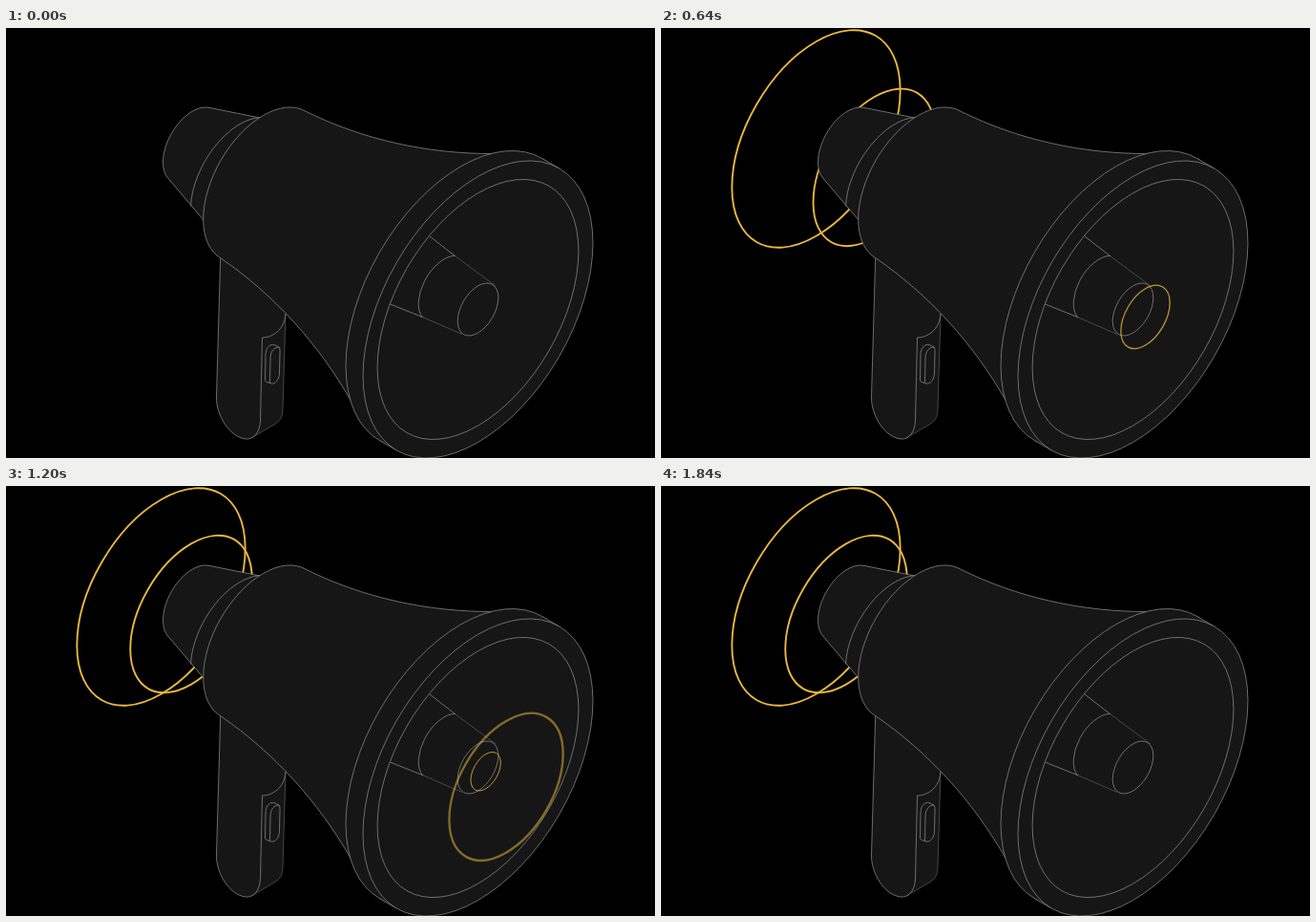
These frames come from a looping animation (680 px wide and 450 px high, 2000 ms). An HTML page with a canvas:

```html
<!DOCTYPE html>
<html lang="en">
<head>
<meta charset="utf-8">
<title>Megaphone</title>
<style>
  html, body { margin: 0; width: 100%; height: 100%; overflow: hidden; background: #000; }
  canvas { display: block; }
</style>
</head>
<body>
<canvas id="stage" width="680" height="450"></canvas>
<script>
const ctx = document.getElementById('stage').getContext('2d');
const LOOP = 2000, STEP = 40, LAST = 1840;
const FILL = '#161616', LINE = '#858585', DIM = '#555', GOLD = '#e9b83e';
const HUB = { x: 494.5, y: 294.5 };
const TILT = -Math.PI / 3;
const MAJOR = Math.sqrt(1.5), MINOR = Math.sqrt(0.5);

const clamp = v => Math.min(1, Math.max(0, v));
const sineOut = p => Math.sin(p * Math.PI / 2);
const sineInOut = p => (1 - Math.cos(p * Math.PI)) / 2;

// A circle of radius r seen in isometric view
function disc(x, y, r) {
  const p = new Path2D();
  p.ellipse(x, y, r * MAJOR, r * MINOR, TILT, 0, Math.PI * 2);
  return p;
}

function paint(path, fill, line, width = 0.8) {
  if (fill) {
    ctx.fillStyle = fill;
    ctx.fill(path);
  }
  if (line) {
    ctx.strokeStyle = line;
    ctx.lineWidth = width;
    ctx.stroke(path);
  }
}

const shape = d => new Path2D(d);

// The left-hand side of an isometric circle, as an SVG arc
const arc = (r, x, y) => `A${r * MAJOR} ${r * MINOR} -60 0 0 ${x} ${y}`;

const cap = shape('M266 94L213 83.4' + arc(35.5, 170.5, 158) + 'L207 201');
const collar = shape('M266 93.6' + arc(59.6, 193.5, 186.5));
const body = shape('M512 131.5C441 132 373 116.5 313.9 87.1' + arc(72.5, 225.1, 240.9) +
  'C279.6 278.3 327 329.4 362 391.2');
const handle = shape('M224.7 235L220.5 386C220 405 234 428 251 430L257 429L281 415' +
  'C287 411 290 408 290 398L293 299V280Z');
const handleFace = shape('M224.7 240L220.5 386C220 405 234 428 251 430' +
  'C259 431 266 424 266.5 411L268.5 324C279 324 292 316 293 299');
const handleSide = shape('M293 299L290 398C290 408 287 411 281 415L257 429');
const button = shape('M271.5 368L272 342C272 334 277 330.5 281 331.5L286 334' +
  'C287 335 287 337 287 339L286.5 361C286.5 368 282 373 278 372L273 370.5C272 370 271.5 369 271.5 368Z');
const buttonFace = shape('M276.5 371L277 346C277 338 281 334 286 334');

const rimBack = disc(476.5, 284, 139.1);
const rimSide = shape('M561.7 136.5L579.7 147L409.3 442L391.3 431.5Z');
const rimEdges = shape('M561.7 136.5L579.7 147M409.3 442L391.3 431.5');
const rimFront = disc(HUB.x, HUB.y, 139.1);
const rimInner = disc(HUB.x, HUB.y, 121.7);
const hub = disc(HUB.x, HUB.y, 24.6);
const coneNear = shape('M444 218L471 239M402.5 289L437 302.8');
const coneFar = shape('M471 239L513 270M437 302.8L478 320.5');
const coneArc = shape('M470.5 238.3' + arc(31, 436.5, 302.8));

function drawBackRings(t) {
  const a = 1 - sineOut(clamp(t / 590));
  paint(disc(162.5 + 266 * a, 116 + 141 * a, 101.8), null, GOLD, 1.9);
  const b = Math.pow(1 - clamp(t / 790), 1.1);
  paint(disc(194 + 182 * b, 134 + 74 * b, 73.6), null, GOLD, 1.9);
}

function drawMegaphone() {
  paint(handle, FILL);
  paint(handleSide, null, DIM);
  paint(handleFace, null, LINE);
  paint(button, FILL, LINE);
  paint(buttonFace, null, LINE);
  paint(cap, FILL, LINE);
  paint(collar, null, LINE);
  paint(body, FILL, LINE);
  paint(rimBack, FILL, LINE);
  paint(rimSide, FILL);
  paint(rimEdges, null, LINE);
  paint(rimFront, FILL, LINE);
  paint(rimInner, null, LINE);
  paint(coneFar, null, DIM);
  paint(coneNear, null, LINE);
  paint(coneArc, null, LINE);
  paint(hub, null, LINE);
}

// Three waves leave the hub, growing, thickening and fading
function drawWaves(t) {
  for (let i = 0; i < 3; i++) {
    const p = (t - 304 - i * 320) / 896;
    if (p <= 0 || p >= 1) continue;
    const s = sineInOut(p);
    ctx.globalAlpha = 1 - Math.pow(p, 1.7);
    paint(disc(495 + 40.5 * s, 293 + 30.5 * s, 96 * s), null, GOLD, 0.4 + 2.7 * s);
  }
  ctx.globalAlpha = 1;
}

function frame() {
  const now = performance.now() % LOOP;
  const t = Math.min(LAST, Math.floor(now / STEP) * STEP);
  ctx.fillStyle = '#000';
  ctx.fillRect(0, 0, 680, 450);
  drawBackRings(t);
  drawMegaphone();
  drawWaves(t);
  requestAnimationFrame(frame);
}
frame();
</script>
</body>
</html>
```
